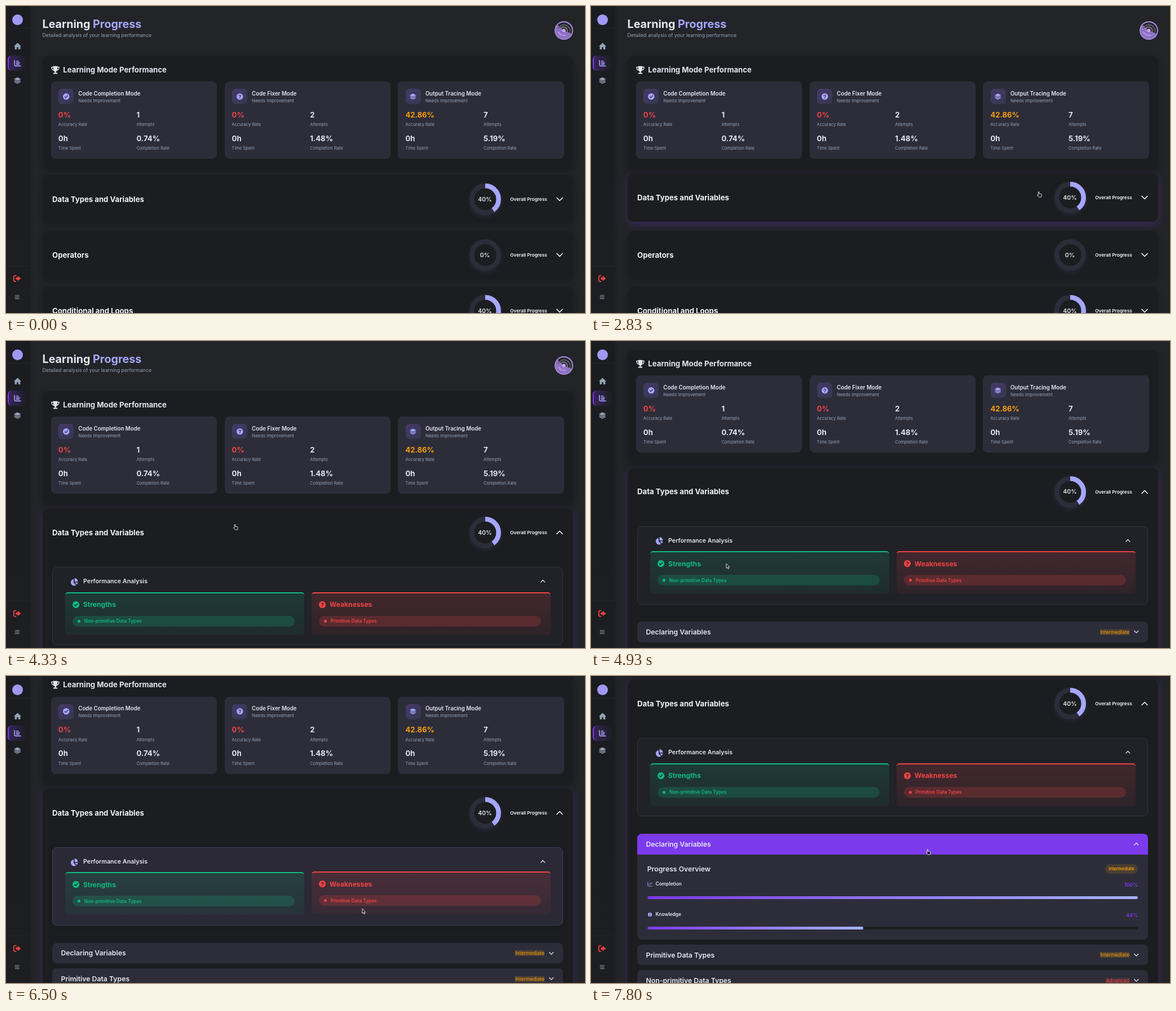
An HTML page that plays this animation: 1027x545 px, repeating every 8 s.

```html
<!DOCTYPE html>
<html lang="en">
<head>
<meta charset="utf-8">
<title>Learning Progress</title>
<style>
html, body { margin: 0; width: 100%; height: 100%; overflow: hidden; background: #232428; }
#stage { position: relative; width: 1027px; height: 545px; overflow: hidden; font-family: Inter, "Open Sans", sans-serif; }
#stage div, #stage svg { position: absolute; box-sizing: border-box; }
#stage svg { overflow: visible; }
.t { white-space: pre; line-height: normal; }
.card { background: #1c1d20; border-radius: 11px; box-shadow: 0 4px 11px rgba(0,0,0,.22); }
.card.hover { box-shadow: 0 6px 15px rgba(124,58,237,.24); }
.tile { background: #2d2d3a; border-radius: 8px; }
.badge { background: linear-gradient(135deg, #443a68, #383650); border-radius: 7px; }
.panel { background: #212228; border: 1px solid #33343d; border-radius: 8px; }
.panel.hover { background: #2a2935; border-color: #42425a; box-shadow: 0 2px 8px rgba(0,0,0,.15); }
.row { background: #2d2d3a; border-radius: 8px; }
.row.open { background: #7c3aed; border-radius: 8px 8px 0 0; }
.body { background: #2d2d3a; border-radius: 0 0 8px 8px; }
.bar { background: #1c1d20; border-radius: 3px; overflow: hidden; }
.fill { background: linear-gradient(90deg, #7c3aed, #a5b4fc); border-radius: 3px; }
.side { background: linear-gradient(180deg, #1b1c20, #1d1e22); box-shadow: 1px 0 6px rgba(0,0,0,.25); }
.active { background: linear-gradient(90deg, rgba(124,58,237,.28), rgba(124,58,237,.02)); border-left: 2px solid #7c3aed; border-radius: 7px; }
</style>
</head>
<body>
<div id="stage"></div>
<script>
const LAV = '#a5a6ff', MUTED = '#94a3b8', LIGHT = '#e5e7f0';
const GREEN = '#10b981', RED = '#ef4444', AMBER = '#f59e0b', VIOLET = '#7c3aed', TILE = '#2d2d3a';
const stage = document.getElementById('stage');

function box(parent, x, y, w, h, cls = '', css = '') {
  const d = document.createElement('div');
  d.className = cls;
  d.style.cssText = `left:${x}px;top:${y}px;width:${w}px;height:${h}px;${css}`;
  parent.append(d);
  return d;
}

// y is the middle of the capitals; align is 0 left, .5 centre, 1 right
function text(parent, x, y, str, size, weight = 400, color = LIGHT, align = 0, css = '') {
  const d = document.createElement('div');
  d.className = 't';
  // browsers round the ascent to whole pixels
  const top = y + size * 0.3637 - Math.round(size * 0.96875);
  const side = align === 1 ? `right:calc(100% - ${x}px)` :
    align ? `left:${x - 50}px;width:100px;text-align:center` : `left:${x}px`;
  d.style.cssText = `${side};top:${top}px;font-size:${size}px;font-weight:${weight};color:${color};${css}`;
  d.textContent = str;
  parent.append(d);
  return d;
}

function icon(parent, cx, cy, size, color, inner) {
  const holder = document.createElement('div');
  holder.style.cssText = `left:${cx - size / 2}px;top:${cy - size / 2}px;width:${size}px;height:${size}px;color:${color}`;
  holder.innerHTML = `<svg width="${size}" height="${size}" viewBox="0 0 24 24" fill="currentColor">${inner}</svg>`;
  parent.append(holder);
  return holder;
}

const line = (d, w = 2.5, color = 'currentColor') =>
  `<path d="${d}" fill="none" stroke="${color}" stroke-width="${w}" stroke-linecap="round" stroke-linejoin="round"/>`;
const shape = d => `<path d="${d}"/>`;

const ICONS = {
  home: shape('M12 1 0 12h3v10h6.500v-7h5v7H21V12h3z'),
  chart: line('M2 3v15q0 3 3 3h17M8 5.500h7M8 10.500h11M8 15.500h9', 3),
  layers: shape('M12 1 24 7 12 13 0 7z') +
    shape('M3 10.500 12 15 21 10.500 24 12 12 18 0 12z') + shape('M3 15.500 12 20 21 15.500 24 17 12 23 0 17z'),
  exit: line('M8 3H5Q1.500 3 1.500 6.500v11Q1.500 21 5 21h3', 3.2) + shape('M14 4v4.500H8v7h6V20l10-8z'),
  menu: line('M3 5h18M3 12h18M3 19h18', 2.2),
  trophy: shape('M6 1h12v3q0 11-4.500 13v3H17q1 0 1 3H6q0-3 1-3h3.500v-3Q6 15 6 4z') + line('M6 4H1.500q0 8 7 9.500M18 4h4.500q0 8-7 9.500', 2.2),
  pie: shape('M10.500 3v11l7.800 7.800A10.500 10.500 0 1 1 10.500 3z') + shape('M13.500 0A10.500 10.500 0 0 1 24 10.500H13.500z') +
    shape('M14 13.500h9.800q-.5 4-3 7z'),
  trend: line('M2 3v15q0 3 3 3h17M7 14l5-5 4 3 6-7', 2.6),
  brain: shape('M11 2v20q-5 1-6-4-4-2-2.500-6Q1 7 5 6q1-5 6-4z') + shape('M13 2v20q5 1 6-4 4-2 2.500-6 1.500-5-2.500-6-1-5-6-4z'),
  check: hole => '<circle cx="12" cy="12" r="12"/>' + line('M7 12.500l3.500 3.500 7-7.500', 3, hole),
  ask: hole => '<circle cx="12" cy="12" r="12"/>' + line('M8.500 9Q9 6.500 12 6.500T15.500 9.500Q15.500 11 12 13.500', 2.6, hole) +
    `<circle cx="12" cy="17.500" r="1.700" fill="${hole}"/>`
};

const chevron = (parent, cx, cy, size) =>
  icon(parent, cx, cy, size, '#f1f2f8', line('M2 7l10 10 10-10', 3.4));

function ring(parent, cy, percent) {
  box(parent, 821.5, cy - 28, 56, 56, '', 'border-radius:50%;box-shadow:0 3px 9px rgba(94,80,170,.2)');
  const circle = (color, extra) =>
    `<circle cx="12" cy="12" r="10.180" fill="none" stroke="${color}" stroke-width="3.640" ${extra}/>`;
  const arc = percent ? circle(LAV, `pathLength="100" stroke-dasharray="${percent} 100" transform="rotate(-90 12 12)"`) : '';
  icon(parent, 849.5, cy, 56, LAV, circle(TILE, '') + arc);
  text(parent, 849.5, cy, percent + '%', 10.5, 600, LIGHT, 0.5);
}

// Page layer
const page = box(stage, 0, 0, 1027, 1400);
text(page, 64.5, 31.5, 'Learning ', 19.69, 700, LIGHT).insertAdjacentHTML('beforeend', `<span style="color:${LAV}">Progress</span>`);
text(page, 64.5, 52, 'Detailed analysis of your learning performance', 8.76, 400, MUTED);

// Avatar
icon(page, 989.5, 43.5, 33, '#a78bda',
  '<circle cx="12" cy="12" r="12"/><circle cx="12" cy="12" r="10.800" fill="#8d72c4"/>' +
  '<path d="M4 5A10.800 10.800 0 0 1 22 16L12 12z" fill="#24242a"/>' +
  line('M5 9A8 8 0 0 1 20 14', 1.5, '#5b5b63') + line('M8 9A5 5 0 0 1 16.500 13', 1.5, '#77757f') +
  '<circle cx="12" cy="12" r="2.200" fill="#c9a6f2"/>' + line('M5 14q3 5 9 4', 1.5, '#b99ae6'));

// Mode overview
const modes = box(page, 64.5, 89, 941, 200, 'card');
icon(modes, 22.8, 24, 15, LIGHT, ICONS.trophy);
text(modes, 36.8, 24, 'Learning Mode Performance', 13.2, 700);
[
  ['Code Completion Mode', ICONS.check('#3e3860'), '0%', RED, '1', '0.74%'],
  ['Code Fixer Mode', ICONS.ask('#3e3860'), '0%', RED, '2', '1.48%'],
  ['Output Tracing Mode', ICONS.layers, '42.86%', AMBER, '7', '5.19%']
].forEach(([name, art, rate, color, tries, done], i) => {
  const tile = box(modes, 15.3 + i * 307.8, 45, 294.7, 137, 'tile');
  box(tile, 13.2, 13, 27, 27, 'badge');
  icon(tile, 26.7, 26.5, 11.5, LAV, art);
  text(tile, 48.5, 21, name, 9.7, 600);
  text(tile, 48.5, 33.8, 'Needs Improvement', 7.85, 400, MUTED);
  const stat = (x, y, value, label, tint = LIGHT) => {
    text(tile, x, y, value, 13.13, 700, tint);
    text(tile, x, y + 17.4, label, 7.5, 400, MUTED);
  };
  stat(13, 59, rate, 'Accuracy Rate', color);
  stat(151.6, 59, tries, 'Attempts');
  stat(13, 101, '0h', 'Time Spent');
  stat(151.6, 101, done, 'Completion Rate');
});

// Topics; inner coordinates keep the page's x
function topic(y, name, percent) {
  const card = box(page, 64.5, y, 941, 86, 'card');
  const inner = box(card, -64.5, 0, 1027, 86);
  text(inner, 82, 43, name, 13.16, 700, '#f1f2f8');
  ring(inner, 43, percent);
  text(inner, 894.3, 43, 'Overall Progress', 8.2, 600, '#f8f9ff');
  return { card, inner, arrow: chevron(inner, 981.7, 43.2, 12) };
}
const first = topic(300, 'Data Types and Variables', 40);
const second = topic(399, 'Operators', 0);
const third = topic(498, 'Conditional and Loops', 40);

// Details of the first topic
const VERDICT_Y = 148.5;
const details = box(first.inner, 0, 0, 1027, 420);
const panel = box(details, 82, 104, 906, 139, 'panel');
icon(details, 121, 130.5, 13.5, LAV, ICONS.pie);
text(details, 137, 129.3, 'Performance Analysis', 10.7, 600);
chevron(details, 952, 129.3, 8.6).style.transform = 'rotate(180deg)';
const split = box(details, 535, 149, 1, 76, '', 'border-left:1px dashed #2e3037');

function verdict(x, title, item, color, rgb, art) {
  const b = box(details, x, VERDICT_Y, 424, 76, '',
    `border-top:2px solid ${color};border-radius:5px;background:linear-gradient(180deg,rgba(${rgb},.16),rgba(${rgb},.06))`);
  const c = box(b, 0, -2, 424, 76);
  icon(c, 19, 22, 12.2, color, art);
  text(c, 31.8, 22, title, 12.1, 700, color);
  box(c, 13, 42, 394, 19, '', `border-radius:10px;background:rgba(${rgb},.2)`);
  box(c, 21.5, 49, 5, 5, '', `border-radius:50%;background:${color}`);
  text(c, 33.7, 51.5, item, 8.25, 600, color);
  return b;
}
const strong = verdict(105, 'Strengths', 'Non-primitive Data Types', GREEN, '16,185,129', ICONS.check('#20332f'));
const weak = verdict(542, 'Weaknesses', 'Primitive Data Types', RED, '239,68,68', ICONS.ask('#3a2428'));

const rows = [
  ['Declaring Variables', 'Intermediate', AMBER, '245,158,11'],
  ['Primitive Data Types', 'Intermediate', AMBER, '245,158,11'],
  ['Non-primitive Data Types', 'Advanced', RED, '239,68,68']
].map(([name, level, color, rgb], i) => {
  const y = 273.8 + i * 45.4;
  const el = box(details, 82, y, 906, 36.5, 'row');
  text(el, 15.5, 18.3, name, 12.25, 600);
  const tag = text(el, 873, 18.3, level, 8.76, 400, color, 1, `background:rgba(${rgb},.18)`);
  return { el, y, tag, arrow: chevron(el, 885.7, 18.3, 8.6) };
});

const body = box(details, 82, 310.3, 906, 151.5, 'body');
text(body, 17.7, 25.5, 'Progress Overview', 12.25, 600);
box(body, 830, 17, 58, 17, '', 'border-radius:9px;background:rgba(245,158,11,.15)');
text(body, 859, 25.5, 'Intermediate', 7.4, 600, AMBER, 0.5);
[['Completion', 100, 'trend'], ['Knowledge', 44, 'brain']].forEach(([name, value, art], i) => {
  const y = 52.5 + i * 54;
  icon(body, 22, y, 9, LAV, ICONS[art]);
  text(body, 32.5, y, name, 8.35, 600);
  text(body, 888, y + 1.5, value + '%', 8.76, 600, VIOLET, 1);
  const bar = box(body, 18, y + 22, 870, 5, 'bar');
  box(bar, 0, 0, 870 * value / 100, 5, 'fill');
});

// Sidebar
const side = box(stage, 0, 0, 42, 545, 'side');
box(side, 10.5, 14.5, 19, 19, '', 'border-radius:50%;background:#a098f2');
box(side, 0, 39, 42, 1, '', 'background:#24252a');
icon(side, 20.2, 71, 13, MUTED, ICONS.home);
box(side, 3, 88, 33, 27, 'active');
icon(side, 20.5, 101.3, 13, LAV, ICONS.chart);
icon(side, 20.2, 132, 12.5, MUTED, ICONS.layers);
box(side, 0, 461, 42, 1, '', 'background:#26272c');
icon(side, 20.2, 484, 13.5, RED, ICONS.exit);
icon(side, 20.2, 517, 9.5, '#b6bccb', ICONS.menu);

// Pointers, with the tip at 0,0
const pointer = d => {
  const p = box(stage, 0, 0, 12, 12);
  p.innerHTML = `<svg width="12" height="12"><path d="${d}" fill="#17181b" stroke="#eef0f5" stroke-width=".9" stroke-linejoin="round"/></svg>`;
  return p;
};
const pointers = {
  arrow: pointer('M0 .3V8.300L1.800 6.700 3.200 9.700 4.600 9.100 3.200 6.200H5.700z'),
  hand: pointer('M-.7 1Q0-.2.8 1V4.200L4.700 4.900Q5.400 5.200 5.300 6L4.700 10H.2L-2.300 6.700Q-2.400 5.500-.7 6.400z')
};

// time, scroll, lift of the first topic, open, hovered verdict, open row, pointer, x, y
const STEPS = [
  [0, 0, 0, 0, 0, 0, '', 0, 0],
  [500, 0, 0, 0, 0, 0, 'arrow', 1, 209.5],
  [533, 0, 0, 0, 0, 0, 'arrow', 42, 229],
  [567, 0, 0, 0, 0, 0, 'arrow', 84, 248],
  [600, 0, 0, 0, 0, 0, 'arrow', 118.5, 263],
  [760, 0, 0, 0, 0, 0, 'arrow', 402, 283],
  [900, 0, 0, 0, 0, 0, 'arrow', 537, 274],
  [1060, 0, 0, 0, 0, 0, 'arrow', 695, 299],
  [1200, 0, 1, 0, 0, 0, 'hand', 731.5, 306.5],
  [1360, 0, 2, 0, 0, 0, 'hand', 731.5, 306.5],
  [1460, 0, 2.7, 0, 0, 0, 'hand', 731.5, 306.5],
  [2500, 0, 2.7, 0, 0, 0, 'hand', 762, 323],
  [2660, 0, 2.7, 0, 0, 0, 'hand', 775.5, 327],
  [2830, 0, 2.7, 0, 0, 0, 'hand', 794, 329],
  [3100, 0, 2.7, 1, 0, 0, 'hand', 794, 329],
  [3260, 0, 2.7, 1, 0, 0, 'hand', 768, 327.5],
  [3600, 0, 2.7, 1, 0, 0, 'hand', 691, 339.5],
  [4330, 0, 2.7, 1, 0, 0, 'hand', 405.5, 325],
  [4930, 72.7, 2.7, 1, 0, 0, 'arrow', 240, 395],
  [5630, 72.7, 2.7, 1, 1, 0, 'arrow', 198.5, 416],
  [6500, 97.4, 2.7, 1, 2, 0, 'arrow', 631.5, 413],
  [7100, 254, 2.7, 1, 0, 0, 'arrow', 631.5, 413],
  [7800, 291, 2.7, 1, 0, 1, 'hand', 596.5, 306.5]
];

const show = (el, on) => { el.style.display = on ? '' : 'none'; };
const flip = (el, on) => { el.style.transform = on ? 'rotate(180deg)' : ''; };
const raise = (el, on) => { el.style.top = VERDICT_Y - (on ? 1.1 : 0) + 'px'; };

function apply([, scroll, lift, open, verdictHover, rowOpen, kind, x, y]) {
  const extra = rowOpen ? 151.5 : 0;
  const height = open ? 415 + extra : 86;
  page.style.top = -scroll + 'px';

  first.card.style.top = 300 - lift + 'px';
  first.card.style.height = height + 'px';
  first.card.classList.toggle('hover', lift > 1);
  flip(first.arrow, open);
  second.card.style.top = 313 + height + 'px';
  third.card.style.top = 412 + height + 'px';

  show(details, open);
  panel.classList.toggle('hover', verdictHover > 0);
  show(split, !verdictHover);
  raise(strong, verdictHover === 1);
  raise(weak, verdictHover === 2);

  show(body, rowOpen);
  rows[0].el.classList.toggle('open', !!rowOpen);
  show(rows[0].tag, !rowOpen);
  flip(rows[0].arrow, rowOpen);
  for (const r of rows.slice(1)) r.el.style.top = r.y + extra + 'px';

  for (const name in pointers) {
    show(pointers[name], name === kind);
    pointers[name].style.left = x + 'px';
    pointers[name].style.top = y + 'px';
  }
}

const start = performance.now();
let current = null;
function tick() {
  const t = (performance.now() - start) % 8000;
  const step = STEPS.findLast(s => s[0] <= t);
  if (step !== current) apply(current = step);
  requestAnimationFrame(tick);
}
tick();
</script>
</body>
</html>
```
